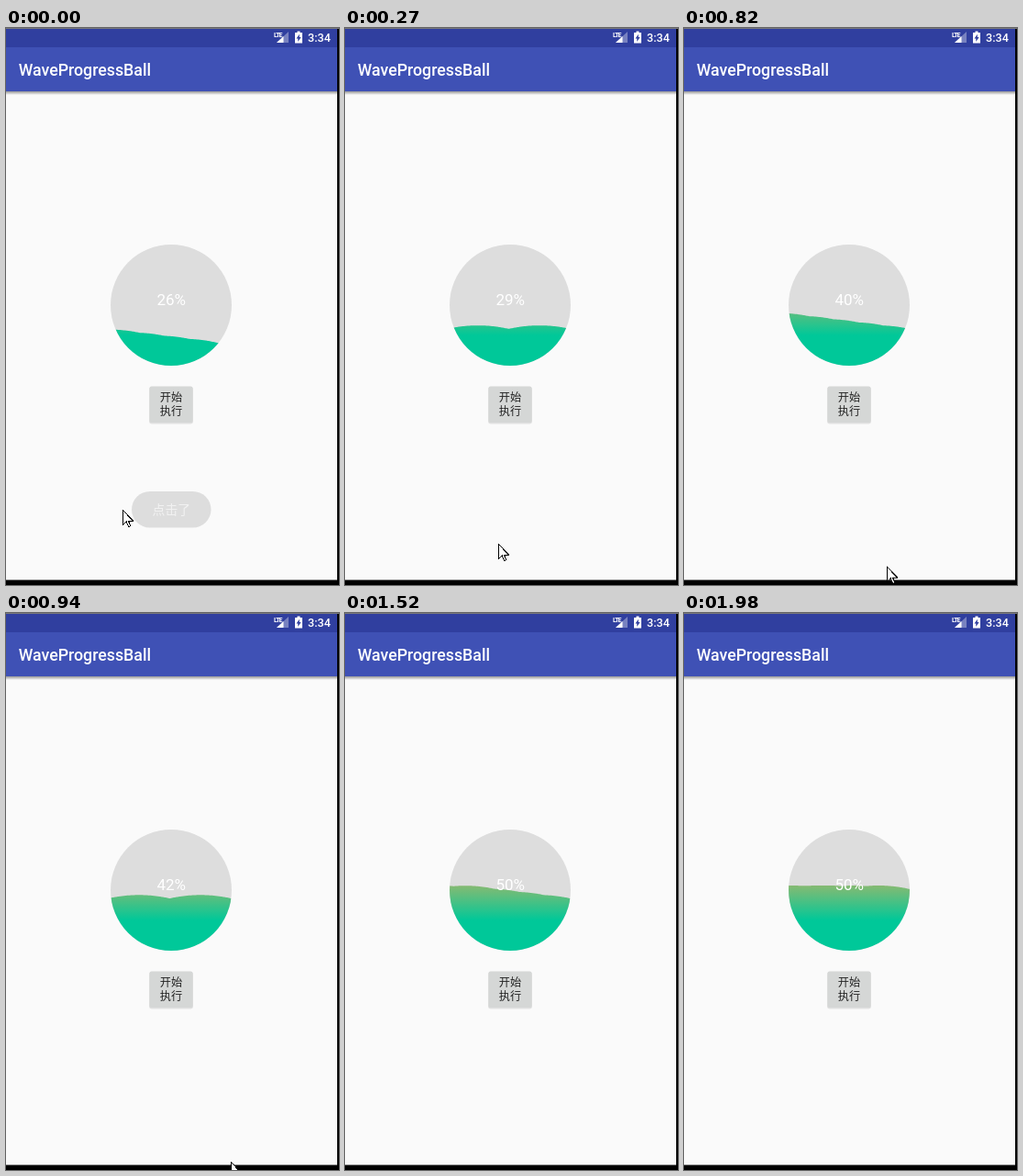
Recreate the animation shown at these times as an HTML page. Size 363 by 607 pixels, loop 2510 ms.

```html
<!DOCTYPE html>
<html lang="zh-CN">
<head>
<meta charset="utf-8">
<title>WaveProgressBall</title>
<style>
  html, body { margin: 0; width: 100%; height: 100%; overflow: hidden; background: #fafafa; }
  svg { display: block; width: 363px; height: 607px; }
  text { font-family: Roboto, "Noto Sans CJK SC", "Noto Sans CJK", sans-serif; fill: #fff; }
  .mid { text-anchor: middle; }
  .medium { font-weight: 500; }
  .lte { font-size: 7px; font-weight: 700; letter-spacing: -.9px; }
  .button text { font-size: 12.2px; fill: #222; }
  .toast, .cursor { animation: toast 2510ms step-end infinite; }
  .cursor { animation-name: cursor; shape-rendering: crispEdges; }
  @keyframes toast { 0% { opacity: 1; } 4.78%, 100% { opacity: 0; } }
  @keyframes cursor {
    0% { transform: translate(127px, 525px); }
    4.78% { transform: translate(156px, 552px); }
    10.75% { transform: translate(167px, 562px); }
    21.91% { transform: translate(173px, 564px); animation-timing-function: steps(3); }
    37.45% { transform: translate(245px, 598px); }
    60.55%, 100% { transform: translate(400px, 700px); }
  }
</style>
</head>
<body>
<svg viewBox="0 0 363 607">
  <defs>
    <linearGradient id="water" gradientUnits="userSpaceOnUse" x1="0" y1="297" x2="0" y2="335">
      <stop offset="0" stop-color="#86ba72"/>
      <stop offset="1" stop-color="#00c899"/>
    </linearGradient>
    <linearGradient id="shade" x1="0" y1="0" x2="0" y2="1">
      <stop offset="0" stop-color="#000" stop-opacity=".4"/>
      <stop offset="1" stop-color="#000" stop-opacity="0"/>
    </linearGradient>
    <clipPath id="disc"><circle cx="180" cy="302" r="66"/></clipPath>
  </defs>

  <rect width="363" height="607" fill="#fafafa"/>
  <rect y="69" width="361" height="4" fill="url(#shade)"/>
  <rect y="21" width="361" height="48" fill="#3f51b5"/>
  <rect width="361" height="21" fill="#303f9f"/>
  <text class="medium" x="13.7" y="52" font-size="17.75">WaveProgressBall</text>

  <g fill="#fff">
    <text class="lte" x="292" y="9.5">LTE</text>
    <path d="M308 4V16H295Z" opacity=".35"/>
    <path d="M302.5 9V16H295Z"/>
    <path d="M317.5 3.5h3v1.5h2.5v11.5h-8V5h2.5Z"/>
    <path d="M319.8 6.8V10h1.8l-3.3 5v-3.6h-1.8Z" fill="#303f9f"/>
    <text class="medium" x="329" y="15" font-size="12.6">3:34</text>
  </g>

  <circle cx="180" cy="302" r="66" fill="#ddd"/>
  <path id="wave" fill="url(#water)" clip-path="url(#disc)"/>
  <text id="percent" class="mid" x="180.3" y="302" font-size="17">26%</text>

  <g class="button">
    <rect x="156" y="391" width="48" height="40.5" rx="3" fill="#000" opacity=".1"/>
    <rect x="156.5" y="390.5" width="47" height="39.5" rx="2" fill="#d5d7d6"/>
    <text class="mid" x="180" y="407">开始</text>
    <text class="mid" x="180" y="421.5">执行</text>
  </g>

  <g class="toast">
    <rect x="137" y="505" width="86.5" height="39.5" rx="19.75" fill="#ddd"/>
    <text class="mid" x="180.3" y="530" font-size="13.8" opacity=".6">点击了</text>
  </g>

  <path d="M361 0h2v607H0v-5.5h361Z"/>
  <rect width="363" height="1" fill="#77777c"/>
  <path class="cursor" d="M.5 .5V16.5L4.2 13L6.7 18.5L8.8 17.6L6.4 12.2H11.5Z" fill="#fff" stroke="#000"/>
</svg>

<script>
  const LOOP = 2510, STEP = 140, LEAD = 40, FIRST = 0.65, LAST = 14;
  const SPACING = 67, DRIFT = 27, SWEEP = 5;

  const wave = document.getElementById("wave");
  const label = document.getElementById("percent");

  const percent = step => Math.min(50, 24.35 + 2.55 * step);

  // Crests drift left from x = 212 and start over with every sweep.
  function surface(step, x) {
    const phase = (step + 3 + 2 * SWEEP) % SWEEP;
    const behind = 212 - DRIFT * phase - x;
    const crest = Math.max(0, Math.round(behind / SPACING));
    const offset = behind - crest * SPACING;
    return 363 - 1.32 * percent(step) + offset ** 2 / 300;
  }

  // Older waves stay painted, so the outline is the highest of the recent ones.
  function outline(step) {
    let d = "M114 368";
    for (let x = 114; x <= 246; x++) {
      let top = 368;
      for (let age = 0; age < 8; age++) top = Math.min(top, surface(step - age, x));
      d += `L${x} ${top.toFixed(2)}`;
    }
    return d + "V368Z";
  }

  let shown;
  function draw() {
    const time = performance.now() % LOOP;
    const tick = Math.floor((time + LEAD) / STEP);
    const step = Math.min(LAST, Math.max(FIRST, tick));
    if (step !== shown) {
      shown = step;
      wave.setAttribute("d", outline(step));
      label.textContent = Math.round(percent(step)) + "%";
    }
    requestAnimationFrame(draw);
  }
  draw();
</script>
</body>
</html>
```
